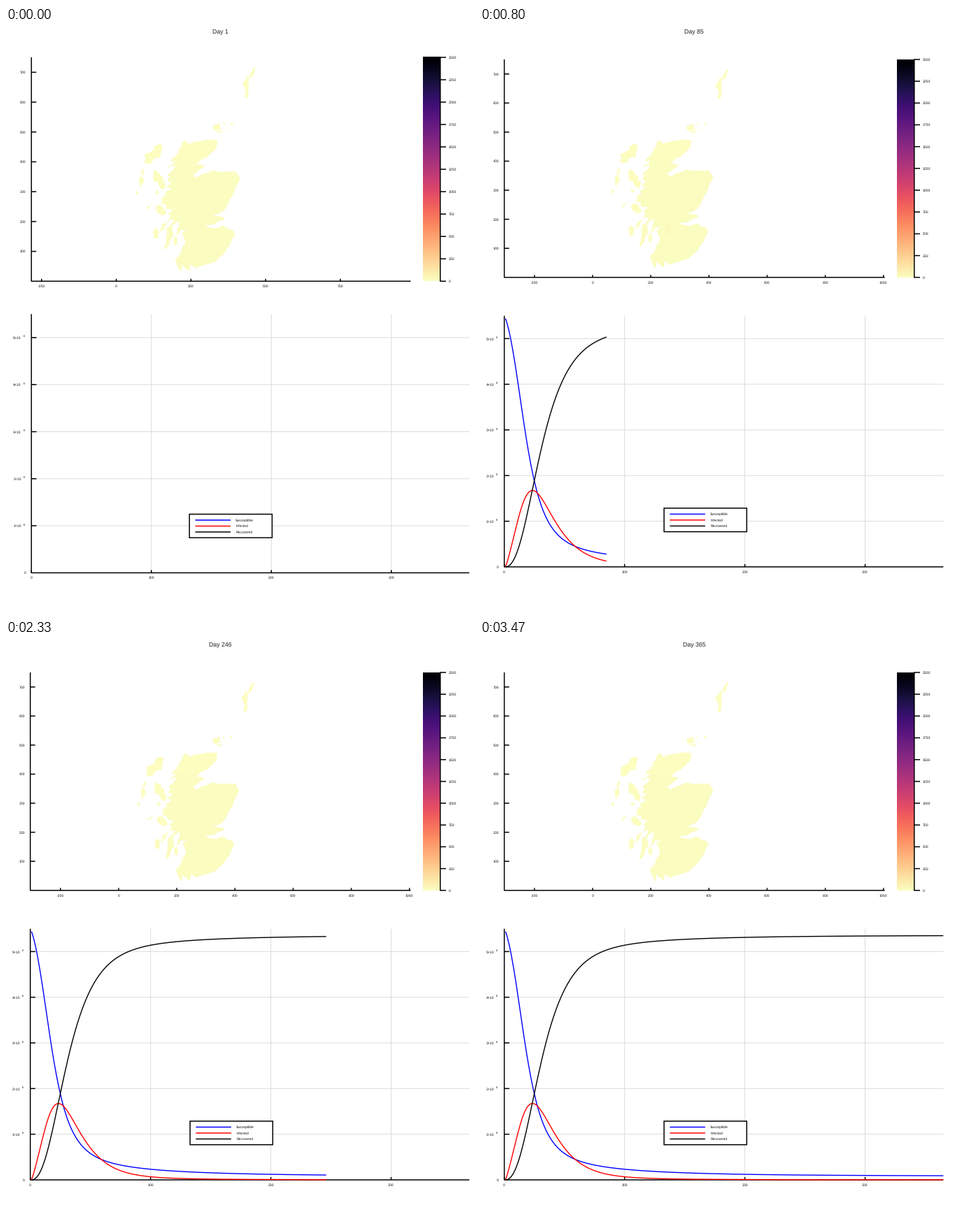
A matplotlib script that plays this animation: 669 px wide and 837 px high, repeating every 3540 ms.

```python
import numpy as np
import matplotlib.pyplot as plt
from matplotlib.animation import FuncAnimation
from matplotlib.collections import PolyCollection
from matplotlib.patches import Rectangle
from matplotlib.path import Path

WIDTH, HEIGHT, DPI = 669, 837, 64
PX = 72 / DPI  # points per pixel
LOOP_MS, TICK_MS, WEEK_MS = 3540, 20, 200 / 3
LAST_WEEK = 52
RIGHT_MAP, RIGHT_PLOT = 578.5, 662.3
CMAP = plt.get_cmap("magma_r")
CASES_MAX = 2500
POPULATION = 5.44  # millions

plt.rcParams.update({"font.family": "Liberation Sans", "text.hinting": "none",
                     "path.snap": False})
rng = np.random.default_rng(7)

# Key points of the mainland coast, clockwise, in km east / km north
EAST = [
    (226, 475), (243, 460), (283, 470), (320, 475), (340, 473), (337, 452),
    (303, 415), (264, 391), (295, 387), (256, 359), (266, 346), (288, 358),
    (324, 371), (400, 367), (414, 346), (396, 306), (372, 257), (356, 234),
    (322, 220), (352, 216), (364, 210), (328, 191), (293, 184), (327, 176),
    (356, 185), (391, 169), (398, 157), (375, 115), (332, 66),
]
SOUTH = [
    (298, 55), (267, 44), (246, 57), (245, 34), (219, 55), (215, 30),
    (198, 72), (208, 82), (221, 110), (232, 127), (220, 159), (241, 176),
    (217, 172), (202, 166), (211, 203), (187, 186), (191, 157), (175, 118),
    (162, 106), (164, 121), (169, 150),
]
WEST = [
    (170, 180), (176, 215), (172, 240), (142, 265), (166, 297), (172, 330),
    (172, 365), (173, 391), (198, 418), (208, 445), (222, 465), (226, 475),
]
# Larger islands: centre, radii, clockwise tilt in degrees
ISLANDS = [
    (125, 425, 17, 42, 40), (85, 345, 6, 32, 8), (144, 340, 14, 36, -30),
    (150, 238, 13, 21, -40), (133, 160, 9, 18, 0), (157, 182, 5, 20, 35),
    (198, 136, 7, 15, 0), (207, 163, 4, 10, 25), (137, 298, 6, 6, 0),
    (110, 250, 2, 17, 55), (437, 650, 7, 40, 0), (455, 698, 5, 21, 25),
    (336, 517, 9, 15, 60),
]
# Loose island groups: centre, spread, count
GROUPS = [(350, 515, 17, 14), (68, 298, 5, 3)]
# Outbreak centres: x, y, spread, cases
CENTRES = [
    (258, 164, 6, 750), (321, 172, 7, 450), (340, 233, 5, 750),
    (391, 307, 6, 450), (275, 165, 22, 150), (325, 200, 20, 110),
    (275, 135, 28, 60), (355, 290, 55, 35),
]
HEAT_BOX = (160, 420, 20, 400)


def roughen(points, amount, levels=3):
    """Midpoint displacement along an open line."""
    z = np.array([complex(*p) for p in points])
    for _ in range(levels):
        step = np.diff(z)
        mid = z[:-1] + step * (0.5 + 1j * rng.uniform(-amount, amount, len(step)))
        z = np.append(np.column_stack([z[:-1], mid]).ravel(), z[-1])
    return np.column_stack([z.real, z.imag])


def sea_lochs(points, count=15):
    """Cut narrow inlets running north-east into an outer coast."""
    pts = np.array(points, float)
    along = np.append(0, np.cumsum(np.hypot(*np.diff(pts, axis=0).T)))
    at = np.linspace(0, along[-1], 2 * count + 1)
    coast = np.column_stack([np.interp(at, along, col) for col in pts.T])
    coast[1::2] += rng.uniform(8, 32, (count, 1)) * (0.85, 0.52)
    return coast


def island(x, y, rx, ry, tilt):
    a = np.linspace(0, 2 * np.pi, 11)
    z = (rx * np.cos(a) + 1j * ry * np.sin(a)) * np.exp(-1j * np.radians(tilt))
    return roughen(np.column_stack([x + z.real, y + z.imag]), 0.35)


def island_group(x, y, spread, count):
    return [island(*rng.normal((x, y), spread), *rng.uniform(1.5, 5, 2),
                   rng.uniform(0, 90)) for _ in range(count)]


def heat_field():
    """Cases per district, districts being the cells around random seeds."""
    x0, x1, y0, y1 = HEAT_BOX
    seeds = [rng.uniform((x0, y0), (x1, y1), (500, 2))]
    seeds += [rng.normal((x, y), 9, (25, 2)) for x, y, _, _ in CENTRES[:6]]
    seeds = np.vstack(seeds)
    cases = np.zeros(len(seeds))
    for x, y, spread, peak in CENTRES:
        d2 = (seeds[:, 0] - x) ** 2 + (seeds[:, 1] - y) ** 2
        cases += peak * np.exp(-d2 / (2 * spread ** 2))
    cases *= rng.uniform(0.5, 1.3, len(seeds))
    gx, gy = np.meshgrid(np.arange(x0 + 1, x1, 2), np.arange(y0 + 1, y1, 2))
    d2 = (gx[..., None] - seeds[:, 0]) ** 2 + (gy[..., None] - seeds[:, 1]) ** 2
    return cases[d2.argmin(axis=2)]


def epidemic(last_day, recovery=0.075, contact=0.355, substeps=20):
    """SIR model with a fading background source; one row S, I, R per day."""
    rows, r = [], 0.0
    for k in range((last_day - 1) * substeps + 1):
        t = k / substeps
        source = 2.25 * (1 - np.exp(-(t / 110) ** 1.09))
        s = POPULATION * np.exp(-contact * r - source)
        i = max(POPULATION - s - r, 0)
        if k % substeps == 0:
            rows.append((s, i, r))
        r += recovery * i / substeps
    return np.array(rows).T


MAINLAND = np.vstack([roughen(EAST, 0.07), roughen(SOUTH, 0.08),
                      roughen(sea_lochs(WEST), 0.15)])
LAND = [MAINLAND] + [island(*spec) for spec in ISLANDS]
for group in GROUPS:
    LAND += island_group(*group)
HEAT = heat_field()

days = np.arange(1, 366)
susceptible, infected, recovered = epidemic(days[-1])
SERIES = [("Susceptible", "#0000ff", susceptible),
          ("Infected", "#ff0000", infected),
          ("Recovered", "#000000", recovered)]

fig = plt.figure(figsize=(WIDTH / DPI, HEIGHT / DPI), dpi=DPI, facecolor="white")
ax = fig.add_axes([0, 0, 1, 1])
ax.set_xlim(0, WIDTH)
ax.set_ylim(HEIGHT, 0)
ax.axis("off")


class Panel:
    """Both charts drawn in pixel space for one set of margins."""

    def __init__(self, left, zero, map_top, map_base, map_ticks,
                 plot_top, plot_base, legend):
        self.left, self.zero = left, zero
        self.map_top, self.map_base = map_top, map_base
        self.plot_top, self.plot_base = plot_top, plot_base
        self.km = (map_base - map_top) / 750
        self.day = (RIGHT_PLOT - left) / 365
        self.million = (plot_base - plot_top) / 5.5
        self.artists = []
        self.draw_map(map_ticks)
        self.draw_colorbar()
        self.draw_plot()
        self.draw_legend(*legend)

    def keep(self, artist):
        self.artists.append(artist)
        return artist

    def line(self, xs, ys, color="black", width=1.5, z=3):
        return self.keep(ax.plot(xs, ys, color=color, lw=width * PX, zorder=z,
                                 solid_capstyle="butt")[0])

    def label(self, x, y, text, ha="center", size=5.1):
        self.keep(ax.text(x, y + 0.36 * size, text, ha=ha, va="baseline",
                          fontsize=size * PX, color="#111111", zorder=6))

    def image(self, data, extent, **kw):
        return self.keep(ax.imshow(data, extent=extent, origin="lower",
                                   aspect="auto", cmap=CMAP, zorder=2, **kw))

    def frame(self, top, base, right):
        self.line([self.left, self.left, right], [top, base, base])

    def to_px(self, pts):
        return np.column_stack([self.zero + self.km * pts[:, 0],
                                self.map_base - self.km * pts[:, 1]])

    def draw_map(self, ticks):
        land = [self.to_px(p) for p in LAND]
        self.keep(ax.add_collection(
            PolyCollection(land, facecolors=[CMAP(0.0)], edgecolors="none", zorder=1),
            autolim=False))
        corners = self.to_px(np.array(HEAT_BOX, float).reshape(2, 2).T)
        (xa, ya), (xb, yb) = corners
        self.heat = self.image(HEAT * 0, (xa, xb, ya, yb), vmin=0, vmax=CASES_MAX,
                               interpolation="nearest")
        self.heat.set_clip_path(Path(land[0]), transform=ax.transData)

        base = self.map_base
        self.frame(self.map_top, base, RIGHT_MAP)
        for v in ticks:
            x = self.zero + self.km * v
            self.line([x, x], [base, base - 3.5])
            self.label(x, base + 7, str(v))
        for v in range(100, 701, 100):
            y = base - self.km * v
            self.line([self.left, self.left + 7], [y, y])
            self.label(self.left - 7.7, y, str(v), "right")

    def draw_colorbar(self):
        top, base = self.map_top, self.map_base
        self.image(np.linspace(0, 1, 256)[:, None], (596, 620.5, base, top))
        self.line([620.8, 620.8], [top - 0.6, base + 0.6])
        for v in range(0, CASES_MAX + 1, 250):
            y = base - (base - top) * v / CASES_MAX
            self.line([620.8, 629], [y, y])
            self.label(632.5, y, str(v), "left")

    def draw_plot(self):
        left, top, base = self.left, self.plot_top, self.plot_base
        for v in range(0, 301, 100):
            x = left + self.day * v
            if v:
                self.line([x, x], [top, base], "#dcdcdc", 1, 1)
            self.line([x, x], [base, base - 4])
            self.label(x, base + 7, str(v))
        self.label(left - 7.7, base, "0", "right")
        for v in range(1, 6):
            y = base - self.million * v
            self.line([left, RIGHT_PLOT], [y, y], "#dcdcdc", 1, 1)
            self.line([left, left + 7.3], [y, y])
            self.label(left - 14.5, y + 0.3, f"{v}×10", "right")
            self.label(left - 10.6, y - 2, "6", size=4)
        self.frame(top, base, RIGHT_PLOT)
        self.curves = [self.line([], [], color, 1.4, 4) for _, color, _ in SERIES]

    def draw_legend(self, x, y):
        self.keep(ax.add_patch(Rectangle((x, y), 118.2, 33.7, facecolor="white",
                                         edgecolor="black", lw=1.5 * PX, zorder=5)))
        for i, (name, color, _) in enumerate(SERIES):
            row = y + 8.5 * (i + 1)
            self.line([x + 8.3, x + 58.8], [row, row], color, 1.5, 6)
            self.label(x + 66, row, name, "left", 4.95)

    def show(self, visible):
        for artist in self.artists:
            artist.set_visible(visible)

    def set_day(self, day):
        count = day if day > 1 else 0
        for curve, (_, _, values) in zip(self.curves, SERIES):
            curve.set_data(self.left + self.day * days[:count],
                           self.plot_base - self.million * values[:count])
        level = (infected[day - 1] / infected[35]) ** 1.3
        self.heat.set_data(HEAT * level)


opening = Panel(36.3, 157.6, 42, 362.3, range(-250, 751, 250),
                409.3, 779.5, (262.2, 695.6))
running = Panel(34.7, 161, 45, 356.8, range(-200, 1001, 200),
                411.7, 771, (263.1, 687))
title = ax.text(306, 8.6, "", ha="center", va="baseline",
                fontsize=8.7 * PX, color="#222222")


def update(frame):
    # each week starts on the nearest hundredth of a second
    week = min(int((TICK_MS * frame + 15) / WEEK_MS), LAST_WEEK)
    day = 1 + 7 * week
    panel = opening if week == 0 else running
    opening.show(panel is opening)
    running.show(panel is running)
    panel.set_day(day)
    title.set_text(f"Day {day}")
    return []


anim = FuncAnimation(fig, update, frames=LOOP_MS // TICK_MS,
                     init_func=lambda: update(0), interval=TICK_MS,
                     repeat=True, repeat_delay=0, blit=False)
plt.show()
```
